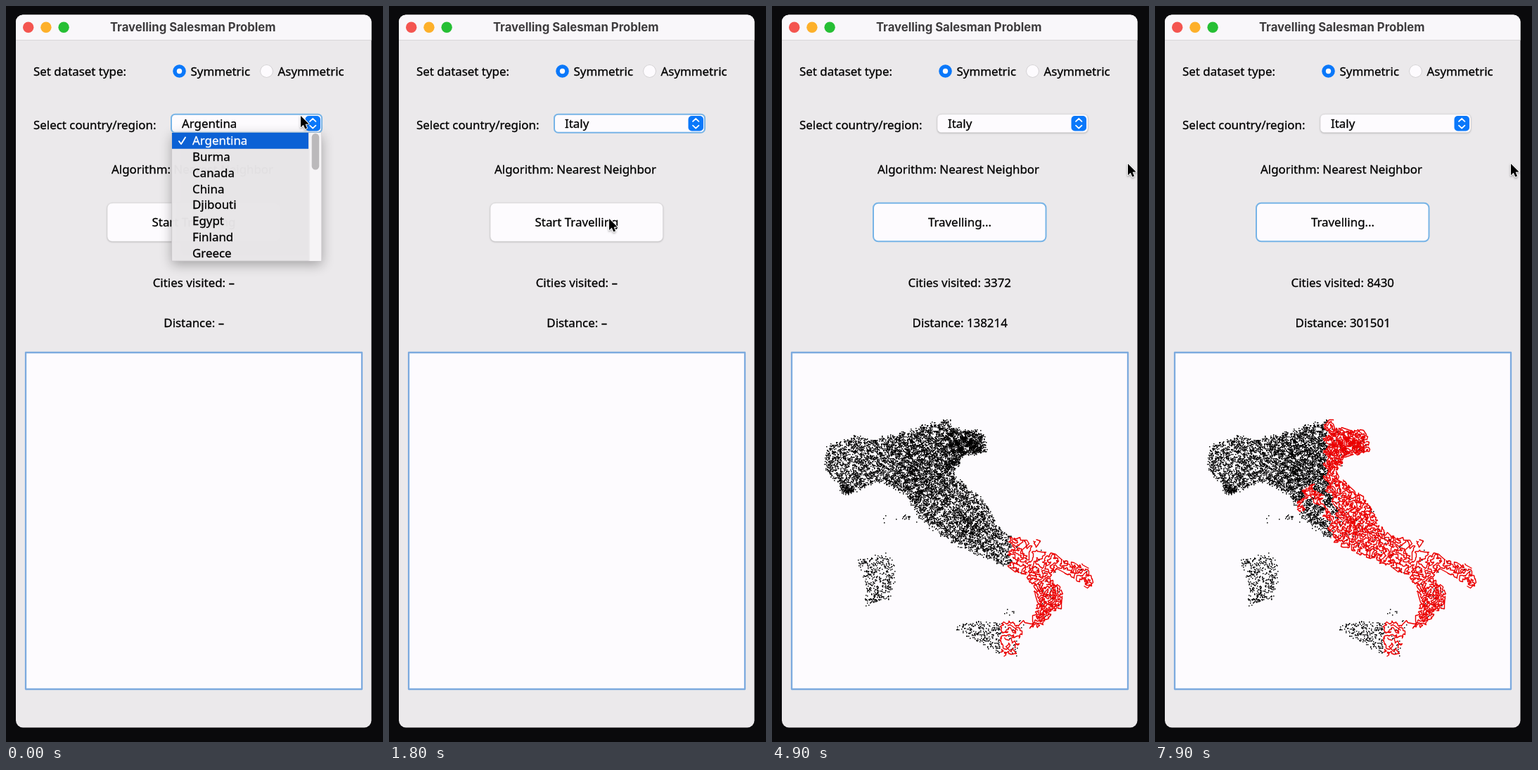
These frames come from a looping animation (536 by 1045 pixels, 8000 ms). An HTML page with a canvas:

```html
<!DOCTYPE html>
<html lang="en">
<head>
<meta charset="utf-8">
<title>Travelling Salesman Problem</title>
<style>
  html, body { margin: 0; width: 100%; height: 100%; overflow: hidden; background: #0a0a0c; }
  canvas { display: block; }
</style>
</head>
<body>
<canvas id="stage" width="536" height="1045"></canvas>
<script>
const W = 536, H = 1045, LOOP = 8000;
const ctx = document.getElementById('stage').getContext('2d');
const FONT = '16.9px "Noto Sans", "Open Sans", sans-serif';
const TITLE_FONT = '700 16.7px Inter, Roboto, sans-serif';
const BLUE = '#0a78fa', RING = '#78b4e6', PAPER = '#fdfbfe', BODY = '#ebe9eb', INK = '#000';

// Timeline in ms
const SCROLL = 300, HOVER = 1000, PICK = 1400, CLICK = 2100, PLOT = 2300;
const TRAVEL = 3800, BATCH_TIME = 960;
const BATCHES = 5, BATCH = 1686;
const DISTANCE = [0, 67780, 138214, 207811, 256340, 301501];

const COUNTRIES = ['Argentina', 'Burma', 'Canada', 'China', 'Djibouti', 'Egypt', 'Finland',
  'Greece', 'Honduras', 'Ireland', 'Italy', 'Japan', 'Kazakhstan'];

// Pointer moves: start, end, target
const MOVES = [
  [100, 450, 374, 257],
  [1000, 1300, 345, 300],
  [1450, 1800, 313, 302],
  [2100, 2500, 339, 317],
  [2800, 3500, 506, 224]
];

const clamp = (v, a, b) => Math.min(b, Math.max(a, v));
const lerp = (a, b, k) => a + (b - a) * k;
const ease = k => k * k * (3 - 2 * k);
const progress = (t, a, b) => clamp((t - a) / (b - a), 0, 1);

function randomizer(seed) {
  return () => {
    seed = (seed + 0x6D2B79F5) | 0;
    let v = Math.imul(seed ^ (seed >>> 15), 1 | seed);
    v = (v + Math.imul(v ^ (v >>> 7), 61 | v)) ^ v;
    return ((v ^ (v >>> 14)) >>> 0) / 4294967296;
  };
}

/* ---------- cities ---------- */

const LAND = new Path2D(
  'M76 626L122 609 140 616 180 607 234 590 250 587 256 599 298 604 305 633 270 637 257 666 ' +
  '300 702 324 744 354 758 382 757 375 768 444 796 459 815 450 824 408 799 394 808 412 834 ' +
  '410 852 380 878 367 884 380 845 367 814 335 796 268 767 212 730 190 691 150 674 104 693 76 655Z' +
  'M260 884L271 876 361 872 350 900 350 922 328 921 304 909Z' +
  'M122 787L162 777 174 797 168 842 132 850 134 822Z');

const bump = (x, y, cx, cy, r) => Math.exp(-((x - cx) ** 2 + (y - cy) ** 2) / (r * r));
const clumps = (x, y) => Math.sin(x * 0.37 + 2 * Math.sin(y * 0.13)) * Math.sin(y * 0.41 + 2 * Math.sin(x * 0.11));
const isIsland = (x, y) => (x < 180 && y > 740) || (x < 362 && y > 866);

function density(x, y) {
  const base = isIsland(x, y) ? 0.15
    : 0.27
      + 0.45 * bump(x, y, 275, 624, 26)
      + 0.18 * bump(x, y, 215, 655, 45)
      + 0.18 * bump(x, y, 282, 735, 22)
      + 0.4 * bump(x, y, 108, 690, 12)
      + 0.15 * bump(x, y, 385, 850, 35)
      - 0.2 * bump(x, y, 378, 772, 34);
  return base * (1 + 0.65 * clumps(x, y));
}

// Batch in which a city is visited, 0 for never
function batchOf(x, y) {
  if (isIsland(x, y)) return x > 323 && clumps(x, y) > -0.3 ? 1 : 0;
  x += 4 * Math.sin(y * 0.35);
  y += 4 * Math.sin(x * 0.3);
  if (y > 802 && x > 360 && x < 418) return 1;
  if (x > 338) return 2;
  // The third batch ends in two trails that meet in the north
  const trail = Math.abs(y - 684 - 1.55 * Math.abs(x - 222)) < 9 && y < 738;
  if (trail || (y > 736 && x > 248) || bump(x, y, 296, 724, 14) > 0.4) return 3;
  if (y > 676) return x > 244 + (y - 680) * 0.35 ? 4 : 0;
  return x > 242 ? 5 : 0;
}

function makeCities() {
  const rnd = randomizer(16862), cities = [];
  const scatter = (cx, cy, rx, ry, n) => {
    while (n--) {
      const x = Math.round(cx + (rnd() - 0.5) * rx), y = Math.round(cy + (rnd() - 0.5) * ry);
      cities.push({ x, y, batch: 0 });
    }
  };
  for (let y = 584; y < 926; y++) {
    for (let x = 72; x < 463; x++) {
      if (rnd() > density(x, y)) continue;
      const px = x + (rnd() - 0.5) * 6, py = y + (rnd() - 0.5) * 6;
      if (ctx.isPointInPath(LAND, px, py)) {
        cities.push({ x, y, batch: rnd() < 0.03 ? 0 : batchOf(x, y) });
      }
    }
  }
  scatter(190, 725, 12, 6, 14);
  scatter(180, 725, 60, 36, 5);
  scatter(342, 861, 24, 10, 7);
  return cities;
}

function nearestTour(left) {
  const tour = [];
  let at = left.pop();
  while (at) {
    tour.push(at);
    let best = -1, min = Infinity;
    left.forEach((c, i) => {
      const d = (c.x - at.x) ** 2 + (c.y - at.y) ** 2;
      if (d < min) { min = d; best = i; }
    });
    if (best < 0) break;
    at = left[best];
    left[best] = left[left.length - 1];
    left.pop();
  }
  return tour;
}

function drawTour(g, tour) {
  tour.forEach((c, i) => {
    const p = tour[i - 1];
    const near = p && Math.hypot(c.x - p.x, c.y - p.y) < 13;
    g[near ? 'lineTo' : 'moveTo'](c.x + 0.5, c.y + 0.5);
  });
}

// One layer for each number of finished batches
function makeMaps() {
  const cities = makeCities(), tours = [], maps = [];
  for (let b = 1; b <= BATCHES; b++) tours.push(nearestTour(cities.filter(c => c.batch === b)));
  for (let done = 0; done <= BATCHES; done++) {
    const layer = document.createElement('canvas');
    layer.width = W;
    layer.height = H;
    const g = layer.getContext('2d');
    for (const c of cities) {
      if (!c.batch || c.batch > done) g.fillRect(c.x, c.y, 1.5, 1.5);
    }
    g.strokeStyle = '#eb0000';
    g.lineWidth = 1.4;
    g.lineJoin = 'round';
    g.beginPath();
    tours.slice(0, done).forEach(tour => drawTour(g, tour));
    g.stroke();
    maps.push(layer);
  }
  return maps;
}

const maps = makeMaps();

/* ---------- widgets ---------- */

function text(s, x, y, align = 'left', color = INK) {
  ctx.font = FONT;
  ctx.textAlign = align;
  ctx.fillStyle = ctx.strokeStyle = color;
  ctx.lineWidth = 0.3;
  ctx.fillText(s, x, y);
  ctx.strokeText(s, x, y);
}

function box(x, y, w, h, r, fill) {
  ctx.beginPath();
  ctx.roundRect(x, y, w, h, r);
  ctx.fillStyle = fill;
  ctx.fill();
}

function disc(x, y, r, fill) {
  ctx.beginPath();
  ctx.arc(x, y, r, 0, Math.PI * 2);
  ctx.fillStyle = fill;
  ctx.fill();
}

function line(points, color, width) {
  ctx.beginPath();
  points.forEach(p => ctx.lineTo(...p));
  ctx.strokeStyle = color;
  ctx.lineWidth = width;
  ctx.lineCap = ctx.lineJoin = 'round';
  ctx.stroke();
}

function shadow(color, blur, dy) {
  ctx.shadowColor = color;
  ctx.shadowBlur = blur;
  ctx.shadowOffsetY = dy;
}

function control(x, y, w, h, r, focused) {
  ctx.save();
  if (!focused) shadow('rgba(0,0,0,.28)', 2.5, 0.8);
  box(x, y, w, h, r, PAPER);
  ctx.restore();
  ctx.strokeStyle = focused ? RING : '#d6d4d6';
  ctx.lineWidth = focused ? 2 : 0.7;
  ctx.stroke();
}

function frame() {
  ctx.fillStyle = '#0a0a0c';
  ctx.fillRect(0, 0, W, H);
  box(14, 12.5, 505.5, 1012, 10, BODY);
  box(14, 12.5, 505.5, 35.5, [10, 10, 0, 0], '#f9f7fa');
  ctx.fillStyle = '#d9d7d9';
  ctx.fillRect(14, 48, 505.5, 1);
  ['#f45550', '#fdb02a', '#26bf34'].forEach((c, i) => disc(31.7 + i * 25.2, 30.3, 7.7, c));
  ctx.font = TITLE_FONT;
  ctx.textAlign = 'center';
  ctx.fillStyle = '#3e3c3e';
  ctx.fillText('Travelling Salesman Problem', 265.7, 35.5);
}

function radio(label, x, on) {
  disc(x, 92.5, 9.3, on ? BLUE : '#cfcdcf');
  disc(x, 92.5, on ? 3.7 : 8.5, PAPER);
  text(label, x + 16, 98.5);
}

function combo(value, focused) {
  text('Select country/region:', 39, 174.5);
  control(235, 153.7, 214, 26, 5.5, focused);
  text(value, 250, 173.3);
  box(425.5, 156, 21.5, 21.5, 5, BLUE);
  for (const dir of [-1, 1]) {
    const y = 166.7 + dir * 2.9;
    line([[432, y], [436.2, y + dir * 4], [440.4, y]], '#fff', 1.8);
  }
}

function popup(t, pointerY) {
  const x = 236, y = 180, w = 212.5, h = 182, row = h / 8;
  const top = 5 * progress(t, SCROLL, SCROLL + 300);
  let active = t < SCROLL ? 0 : -1;
  if (t > HOVER) active = Math.floor((pointerY - y) / row + top);

  ctx.save();
  ctx.globalAlpha = 0.96;
  shadow('rgba(0,0,0,.32)', 16, 5);
  box(x, y, w, h, 0, BODY);
  ctx.restore();
  ctx.strokeStyle = '#c9c7c9';
  ctx.lineWidth = 0.8;
  ctx.strokeRect(x, y, w, h);

  ctx.save();
  ctx.beginPath();
  ctx.rect(x, y, w, h);
  ctx.clip();
  COUNTRIES.forEach((name, i) => {
    const ry = y + (i - top) * row, color = i === active ? '#fff' : INK;
    if (i === active) box(x, ry, 194, row, 0, '#0b61d5');
    text(name, 265, ry + 17.4, 'left', color);
    if (i === 0) line([[246, ry + 12], [249, ry + 16], [255, ry + 6.5]], color, 1.9);
  });
  box(430.5, y, 18, h, 0, '#f6f4f6');
  box(430.5, y, 1, h, 0, '#e3e1e3');
  box(434.7, 181 + top * 6.6, 10.5, 51.5, 5.2, '#bbb9bb');
  ctx.restore();
}

function pointerAt(t) {
  let x = 419, y = 156;
  for (const [from, to, tx, ty] of MOVES) {
    const k = ease(progress(t, from, to));
    x = lerp(x, tx, k);
    y = lerp(y, ty, k);
  }
  return [x, y];
}

function arrow(x, y) {
  ctx.save();
  ctx.translate(x, y);
  ctx.scale(0.93, 0.95);
  ctx.beginPath();
  [[0, 0], [0, 17], [4, 13.4], [6.8, 19.6], [9.7, 18.3], [7.1, 12.3], [12.4, 12]]
    .forEach(p => ctx.lineTo(...p));
  ctx.closePath();
  ctx.save();
  shadow('rgba(0,0,0,.35)', 3, 1.5);
  ctx.strokeStyle = '#fff';
  ctx.lineWidth = 2;
  ctx.lineJoin = 'round';
  ctx.stroke();
  ctx.restore();
  ctx.fillStyle = INK;
  ctx.fill();
  ctx.restore();
}

function panel(t, done) {
  ctx.fillStyle = PAPER;
  ctx.fillRect(27, 491, 480, 480);
  ctx.strokeStyle = '#7caade';
  ctx.lineWidth = 2.3;
  ctx.strokeRect(28, 492, 478, 478);
  if (t < PLOT) return;
  // The northern strip stays blank until the tour starts
  const top = done ? 494 : 611, h = 968 - top;
  ctx.drawImage(maps[done], 29, top, 476, h, 29, top, 476, h);
}

function draw(t) {
  const clicked = t >= CLICK;
  const done = clamp(Math.floor((t - TRAVEL) / BATCH_TIME) + 1, 0, BATCHES);
  const [px, py] = pointerAt(t);
  const label = done ? 'Travelling...' : clicked ? 'Calculating...' : 'Start Travelling';

  frame();
  text('Set dataset type:', 39, 98.5);
  radio('Symmetric', 246.5, true);
  radio('Asymmetric', 370.5, false);
  combo(t < PICK ? 'Argentina' : 'Italy', !clicked);
  text('Algorithm: Nearest Neighbor', 150, 237.7);
  control(144, 279.7, 245.5, 54.6, 7, clicked);
  text(label, 267, 312.5, 'center');
  text('Cities visited: ' + (clicked ? done * BATCH : '–'), 266.8, 398.5, 'center');
  text('Distance: ' + (clicked ? DISTANCE[done] : '–'), 267.2, 455.5, 'center');
  panel(t, done);
  if (t < PICK) popup(t, py);
  arrow(px, py);
}

const start = performance.now();
function tick() {
  const t = (performance.now() - start) % LOOP;
  draw(Math.floor(t / 100) * 100);
  requestAnimationFrame(tick);
}
tick();
</script>
</body>
</html>
```
